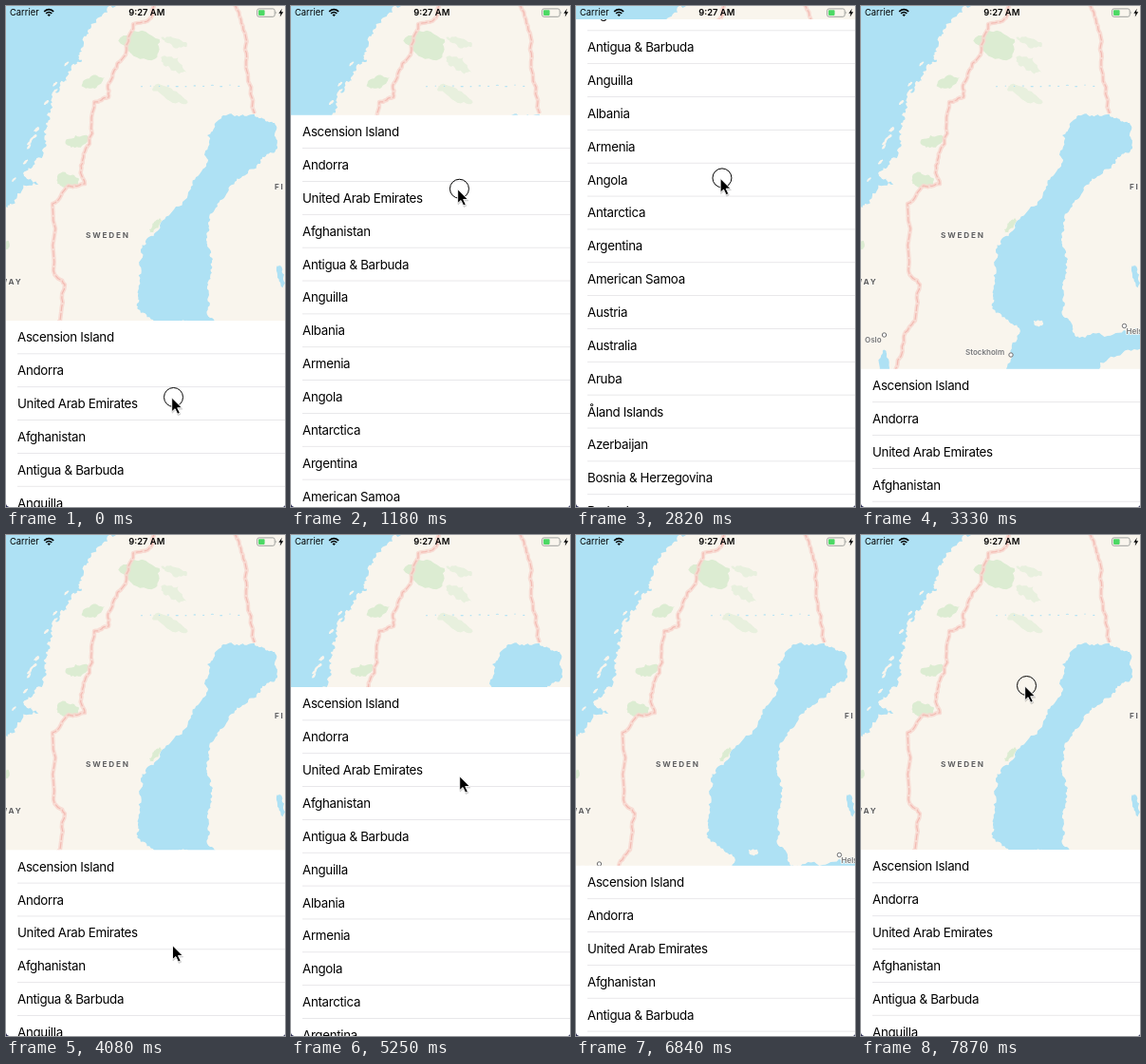
An HTML page for the animation above (8000 ms loop, 294 by 527 pixels).

```html
<!DOCTYPE html>
<html lang="en">
<head>
<meta charset="utf-8">
<title>Country list over a map</title>
<style>
  html, body { margin: 0; width: 100%; height: 100%; overflow: hidden; background: #f9f5ed; }
  svg { display: block; width: 294px; height: 527px; font-family: Inter, "Liberation Sans", sans-serif; }
  .country { font-size: 8.2px; font-weight: 700; letter-spacing: 1.8px; fill: #5f5f60; }
  .city { font-size: 8px; font-weight: 600; fill: #77787a; }
  .row { font-size: 13.33px; letter-spacing: -.31px; fill: #000; }
  .halo { stroke: #fbf8f2; stroke-width: 1.6px; paint-order: stroke; }
</style>
</head>
<body>
<svg viewBox="0 0 294 527">
  <defs>
    <clipPath id="below"><rect y="14" width="294" height="513"/></clipPath>
  </defs>
  <rect width="294" height="527" fill="#f9f5ed"/>
  <g id="map"></g>
  <g clip-path="url(#below)"><g id="sheet"></g></g>
  <g id="status">
    <text x="4" y="10.4" font-size="9.4">Carrier</text>
    <g transform="translate(.6 0)" fill="none" stroke="#000" stroke-width="1.6">
      <path d="M39.6 5.8Q44.6 1.3 49.6 5.8M41.5 7.9Q44.6 5.1 47.7 7.9"/>
      <path d="M44.6 11L42.9 9.2Q44.6 7.9 46.3 9.2Z" fill="#000" stroke="none"/>
    </g>
    <text x="148.3" y="10.4" font-size="9.4" font-weight="600" text-anchor="middle">9:27 AM</text>
    <rect x="264.6" y="2.9" width="18.6" height="8.4" rx="2" fill="none" stroke="#8b8d8c" stroke-width=".8"/>
    <path d="M284.2 5.6Q285.6 7.1 284.2 8.6Z" fill="#8b8d8c"/>
    <rect x="266" y="4.3" width="6.6" height="5.6" rx=".8" fill="#4cd964"/>
    <path d="M290.8 2.8L287.4 7.7H289.5L288.7 11.4L292.2 6.3H290Z"/>
  </g>
  <path d="M0 527V523.6Q.4 526.5 3.4 527ZM294 527V525Q293.7 526.7 292 527Z" fill="#2a2c55"/>
  <g id="pointer">
    <circle id="touch" r="10" fill="none" stroke="#000"/>
    <path id="arrow" d="M-1.8 .5V15.3L1.6 12.2L4.3 17.8L6.8 16.6L4.2 11.2H8.9Z" stroke="#fff" stroke-width=".9"/>
  </g>
</svg>
<script>
const LOOP = 8000, REST = 331, MID = 160, TOP = -170, PITCH = 34.85;
const SLACK = 7; // finger travel before the sheet follows
const WATER = '#aee1f4', LAND = '#f9f5ed', GREEN = '#dcecd2', PALE = '#e8f0de';
const $ = id => document.getElementById(id);
const map = $('map'), sheet = $('sheet'), pointer = $('pointer'), touch = $('touch');

function add(parent, tag, attrs, text) {
  const node = document.createElementNS('http://www.w3.org/2000/svg', tag);
  for (const k in attrs) node.setAttribute(k, attrs[k]);
  if (text) node.textContent = text;
  return parent.appendChild(node);
}

let seed = 11;
const rnd = () => (seed = (seed * 16807) % 2147483647) / 2147483647;

const points = s => s.split(',').map(p => p.trim().split(/\s+/).map(Number));

// Midpoint displacement, capped so that lines stay near their key points.
function rough(pts, amp, depth, cap = 5) {
  for (; depth > 0; depth--) {
    pts = pts.flatMap((a, i) => {
      const b = pts[i + 1];
      if (!b) return [a];
      const dx = b[0] - a[0], dy = b[1] - a[1];
      const k = (rnd() - .5) * Math.min(amp, cap / Math.hypot(dx, dy));
      return [a, [a[0] + dx / 2 - dy * k, a[1] + dy / 2 + dx * k]];
    });
  }
  return pts;
}

const line = pts => 'M' + pts.map(p => p[0].toFixed(1) + ' ' + p[1].toFixed(1)).join('L');

function blob(x, y, rx, ry, fill, tilt = 0) {
  const ring = Array.from({ length: 8 }, (_, i) => {
    const r = .75 + rnd() * .4, a = i * Math.PI / 4;
    return [rx * r * Math.cos(a), ry * r * Math.sin(a)];
  });
  add(map, 'path', {
    d: line(rough([...ring, ring[0]], .5, 2)) + 'Z', fill,
    transform: `translate(${x} ${y}) rotate(${tilt})`
  });
}

function border(s) {
  const d = line(rough(points(s), .3, 3, 4));
  const base = { d, fill: 'none', 'stroke-linejoin': 'round' };
  add(map, 'path', { ...base, stroke: '#f8d6cf', 'stroke-width': 4.4, opacity: .8 });
  add(map, 'path', { ...base, stroke: '#f3bbb3', 'stroke-width': 1.2, 'stroke-dasharray': '7 2' });
}

function city(x, y, name, tx, ty) {
  add(map, 'circle', { cx: x, cy: y, r: 2.2, fill: '#fff', stroke: '#6c6d6f', 'stroke-width': 1 });
  add(map, 'text', { x: tx, y: ty, class: 'city halo' }, name);
}

function country(x, y, name, anchor = 'start') {
  add(map, 'text', { x, y, class: 'country halo', 'text-anchor': anchor }, name);
}

function drawMap() {
  // Forests
  blob(144, 42, 24, 16, GREEN, 12);
  blob(177, 62, 14, 8, PALE, 30);
  blob(172, 92, 20, 6, PALE, 25);
  blob(178, 38, 14, 5, PALE, 20);
  blob(91, 80, 12, 7, GREEN, -20);
  blob(75, 143, 13, 7, GREEN, -15);
  blob(65, 184, 12, 9, GREEN, -15);
  blob(157, 231, 4, 10, GREEN, 35);
  blob(-1, 252, 5, 6, GREEN);

  // Norwegian coast with skerries
  const coast = points('115 -3, 90 22, 80 48, 73 62, 61 80, 48 105, 44 126, 38 152, 18 176, 34 188, 4 208, -4 217');
  add(map, 'path', { d: line(rough(coast, .9, 4, 9)) + 'L-4 -3Z', fill: WATER });
  for (let i = 0; i < 12; i++) {
    const k = rnd();
    blob(82 - 70 * k - rnd() * 5, 20 + 165 * k, 3.5, 1.4, LAND, -45);
  }

  // Gulf of Bothnia and the Baltic: east shore, west shore, south shore
  const gulf = points(`300 335, 277 341, 230 349, 215 328, 213 293, 217 268, 211 245, 217 218, 238 188,
    264 168, 286 150, 283 123, 262 114, 229 115, 212 136, 211 166, 192 196, 162 231, 142 256, 139 300,
    139 319, 167 339, 153 382, 126 440, 60 497, 50 532,
    91 540, 140 514, 165 526, 208 508, 207 463, 246 443, 252 375, 300 357`);
  add(map, 'path', { d: line(rough(gulf, .6, 4)) + 'Z', fill: WATER });
  blob(187, 334, 6, 4, LAND);
  blob(162, 429, 6, 14, LAND, 20);
  blob(234, 402, 10, 7, LAND);

  // Lakes
  blob(24, 378, 5, 20, WATER);
  blob(290, 283, 4, 14, WATER, -10);
  for (let i = 0; i < 12; i++)
    add(map, 'ellipse', { cx: 143 + i * 9.3, cy: 83 + rnd() * 2, rx: .6 + rnd() * 1.3, ry: .6, fill: WATER });

  border(`155 -3, 153 12, 134 19, 123 55, 108 82, 108 96, 93 101, 88 145, 79 168, 83 187, 66 189,
    49 208, 50 278, 62 293, 57 331, 45 348, 36 388`);
  border('239 -3, 250 25, 253 58, 262 113');

  country(84, 244, 'SWEDEN');
  country(17.6, 292.8, 'NORWAY', 'end');
  country(283, 193, 'FINLAND');
  city(24.5, 346, 'Oslo', 4, 354);
  city(277.5, 336.5, 'Helsinki', 279.5, 345);
  city(158, 367, 'Stockholm', 110, 367);
  city(283, 517.5, 'Vilnius', 286, 526);
  add(map, 'text', { x: 7.5, y: 519.3, 'font-size': 7.2, fill: '#6c6c6e', 'text-decoration': 'underline' }, 'Legal');
}

function drawList() {
  const names = ['Ascension Island', 'Andorra', 'United Arab Emirates', 'Afghanistan', 'Antigua & Barbuda',
    'Anguilla', 'Albania', 'Armenia', 'Angola', 'Antarctica', 'Argentina', 'American Samoa', 'Austria',
    'Australia', 'Aruba', 'Åland Islands', 'Azerbaijan', 'Bosnia & Herzegovina', 'Barbados', 'Bangladesh'];
  add(sheet, 'rect', { width: 294, height: PITCH * names.length, fill: '#fff' });
  names.forEach((name, i) => {
    add(sheet, 'text', { x: 12, y: i * PITCH + 22.4, class: 'row' }, name);
    add(sheet, 'rect', { x: 12, y: (i + 1) * PITCH - .4, width: 282, height: .8, fill: '#e3e2e5' });
  });
}

const power = p => k => k ** p;
const smooth = k => k * k * (3 - 2 * k);
const settle = k => 1 - (1 - k) ** 3;

// A drag moves sheet and hand together; v is the release speed, w the spring's pull-back rate.
const drags = [
  { a: 890, b: 1440, from: REST, to: TOP, ease: power(1.32), v: -1.2, w: .0123, hand: [176.5, 411.5] },
  { a: 2530, b: 3270, from: TOP, to: REST, ease: power(2.34), v: 1.58, w: .0105, hand: [153.7, 123.7] },
  { a: 4380, b: 5130, from: REST, to: MID, ease: smooth, v: 0, w: 1, hand: [177.3, 431.3] },
  { a: 6080, b: 6580, from: MID, to: REST, ease: power(3), v: 1, w: .0105, hand: [179.5, 253.5] }
];

// Free hand movement between drags.
const glides = [
  { a: 1700, b: 2120, start: [158, -20], end: drags[1].hand, ease: settle },
  { a: 3390, b: 4080, start: [172, 545], end: drags[2].hand, ease: settle },
  { a: 6870, b: 7300, start: [186, 545], end: [184, 424], ease: settle },
  { a: 7480, b: 7700, start: [184, 424], end: [174.5, 158.5], ease: smooth }
];

const moves = [...drags, ...glides].sort((m, n) => m.a - n.a);
const touches = [[0, 50], [890, 1440], [2530, 3270], [4380, 5250], [6080, 6870], [7870, LOOP]];

const latest = (list, t) => list.filter(m => m.a <= t).pop() || list[0];
const progress = (m, t) => m.ease(Math.max(0, Math.min(1, (t - m.a) / (m.b - m.a))));

function sheetTop(t) {
  const d = latest(drags, t), past = Math.max(0, t - d.b);
  return d.from + (d.to - d.from) * progress(d, t) + d.v * past * Math.exp(-d.w * past);
}

function handAt(t) {
  const m = latest(moves, t), k = progress(m, t);
  if (m.start) return m.start.map((v, i) => v + (m.end[i] - v) * k);
  const way = m.to - m.from, past = Math.max(0, t - m.b);
  return [m.hand[0] + 2.2 * k, m.hand[1] + (way + SLACK * Math.sign(way)) * k + m.v * past];
}

const place = (node, x, y) => node.setAttribute('transform', `translate(${x.toFixed(2)} ${y.toFixed(2)})`);

function render(t) {
  place(sheet, 0, sheetTop(t));
  place(pointer, ...handAt(t));
  touch.setAttribute('visibility', touches.some(([a, b]) => t >= a && t < b) ? 'visible' : 'hidden');
}

const shadow = $('arrow').cloneNode();
for (const [k, v] of Object.entries({ id: 'shade', opacity: .18, stroke: '#000', transform: 'translate(.5 1.4)' }))
  shadow.setAttribute(k, v);
pointer.insertBefore(shadow, $('arrow'));

drawMap();
drawList();
const start = performance.now();
function tick() {
  render((performance.now() - start) % LOOP);
  requestAnimationFrame(tick);
}
tick();
</script>
</body>
</html>
```
